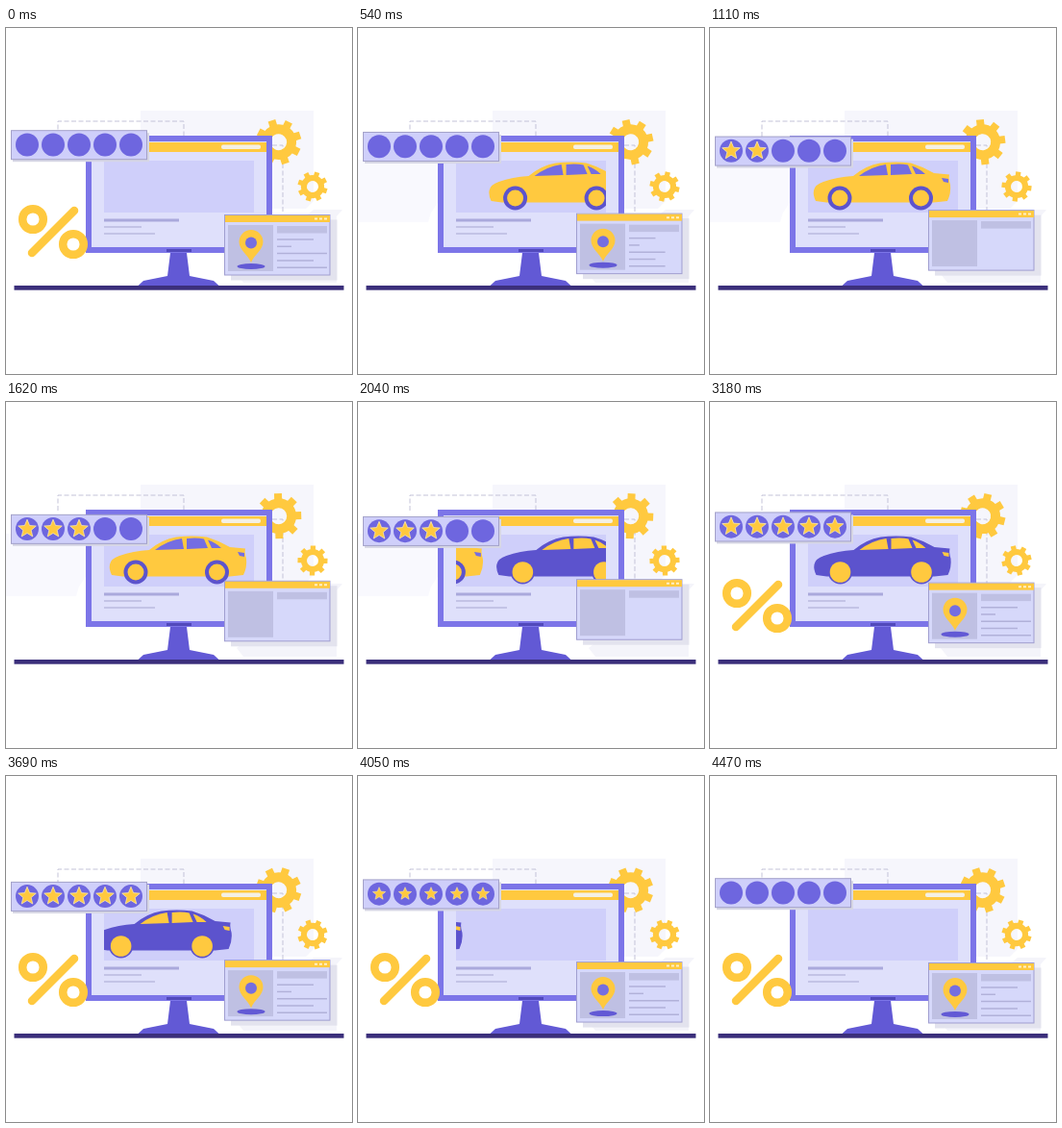
An HTML page for the animation above (4500 ms loop, 360 by 360 pixels).

```html
<!DOCTYPE html>
<html lang="en">
<head>
<meta charset="utf-8">
<title>Car rating</title>
<style>
html, body { margin: 0; width: 100%; height: 100%; overflow: hidden; background: #fff; }
svg { display: block; width: 100vw; height: 100vh; }
</style>
</head>
<body>
<svg viewBox="0 0 360 360">
  <defs>
    <clipPath id="screen"><rect x="102" y="134" width="156" height="58"/></clipPath>
    <g id="car">
      <path class="body" d="M-27 -8Q-26 -14 -17 -17Q-3 -22 14 -23Q27 -34 42 -36.500Q58 -38.500 74 -36.500Q86 -33 98 -26L114 -24.500Q113 -20 115 -14Q116 -5 112 3L98 4.500H-14L-25 3Q-28 -3 -27 -8Z"/>
      <path class="glass" d="M20 -23Q33 -33 48 -35L50 -24ZM53 -35Q64 -36 71 -34.500L75 -25L53 -24ZM75 -33.500Q83 -31 89 -25L79 -25Z"/>
      <path class="glass" d="M106 -21L113 -20V-16L108 -17Z"/>
    </g>
  </defs>

  <path d="M140 86H320V180L312 188H140Z" fill="#f6f6fc"/>
  <path id="haze" d="M0 137H84V180L76 192L73 202H0Z" fill="#f9f9fe"/>
  <path d="M54 113V97H185V113M262 122H288V192" fill="none" stroke="#c3c2d8" stroke-dasharray="5 2.500"/>
  <g fill="none" stroke="#ffc93f">
    <g id="bigGear"></g>
    <g id="smallGear"></g>
  </g>

  <path d="M320 189H350L344 196V265H247L240 256Z" fill="#f4f4fa"/>
  <rect x="83" y="112" width="194" height="122" fill="#7c75e8"/>
  <rect x="89" y="118" width="182" height="110" fill="#dfe0fb"/>
  <rect x="89" y="119" width="182" height="10" fill="#ffc93f"/>
  <rect x="224" y="121.500" width="41" height="4.500" rx="2" fill="#f4f0e4"/>
  <rect x="102" y="138" width="156" height="54" fill="#cfcffa"/>
  <path d="M102 200H180" stroke="#aaa9dc" stroke-width="3"/>
  <path d="M102 207H141M102 214H155" stroke="#bbbbe0" stroke-width="1.500"/>
  <g clip-path="url(#screen)"><g id="yellowCar"></g><g id="purpleCar"></g></g>
  <path d="M171 234H188L191 258L216 263L222 268.500H137L143 263L168 258Z" fill="#6259d5"/>
  <path d="M167 230H193V233H167Z" fill="#5149bb"/>
  <rect x="8.500" y="268" width="343" height="4.700" fill="#3b2f7b"/>

  <g id="percent" fill="none" stroke="#ffc93f" stroke-width="8.500">
    <circle cx="28" cy="199" r="10.800"/>
    <circle cx="70" cy="225" r="10.800"/>
    <path d="M27 234L71 190" stroke-linecap="round"/>
  </g>

  <g id="rating">
    <rect x="7" y="3" width="142" height="30" fill="#d6d6e4"/>
    <rect x="5.500" y=".5" width="141" height="30" fill="#cfcffa" stroke="#a3a1c9"/>
  </g>

  <g id="card">
    <rect x="234" y="5.500" width="110.500" height="63" fill="#e3e3ee"/>
    <rect x="227.500" y=".5" width="109.500" height="62.500" fill="#d6d8fa" stroke="#a09ed0"/>
    <rect x="228" y="1" width="109" height="7" fill="#ffc93f"/>
    <path d="M321 4.500H335" stroke="#fff0c4" stroke-width="2" stroke-dasharray="3 2"/>
    <rect x="231" y="11" width="47" height="48" fill="#bfc0e3"/>
    <rect x="282" y="12" width="52" height="7.500" fill="#bfc0e3"/>
    <g id="lines" stroke="#b1b1d9" stroke-width="1.500"></g>
    <ellipse id="pinShadow" cx="255" cy="54" rx="14.500" ry="3" fill="#6259d5"/>
    <g id="pin">
      <path d="M255 50C252 42 242.500 37 242.500 28.500A12.500 12.500 0 0 1 267.500 28.500C267.500 37 258 42 255 50Z" fill="#ffc93f"/>
      <circle cx="255" cy="29.500" r="6" fill="#756ee0"/>
    </g>
  </g>
</svg>
<script>
const LOOP = 4500, SLIDE = 600, STEP = 156;
const YELLOW = '#ffc93f', PURPLE = '#5c53cd', VIOLET = '#746de2';
const ENTER = 110, SWAP = 1632, LEAVE = 3567;
const $ = id => document.getElementById(id);

// eased 0..1 progress of a move
const ease = (t, start, length) => {
  const p = Math.min(1, Math.max(0, (t - start) / length));
  return (1 - Math.cos(Math.PI * p)) / 2;
};
const move = (id, x, y, rest = '') => $(id).setAttribute('transform', `translate(${x} ${y}) ${rest}`);
const scaleAround = (id, x, y, s) => move(id, x, y, `scale(${s}) translate(${-x} ${-y})`);

function add(parent, tag, attrs) {
  const node = document.createElementNS('http://www.w3.org/2000/svg', tag);
  for (const name in attrs) node.setAttribute(name, attrs[name]);
  return parent.appendChild(node);
}

function buildCar(id, body, accent, tyre) {
  const car = $(id);
  for (const part of $('car').children) {
    const copy = car.appendChild(part.cloneNode());
    copy.setAttribute('fill', part.matches('.body') ? body : accent);
  }
  for (const cx of [0, 84.5]) {
    add(car, 'circle', { cx, r: 12.5, fill: tyre });
    add(car, 'circle', { cx, r: tyre === body ? 10.8 : 8.5, fill: YELLOW });
  }
}

function buildGear(id, outer, hole) {
  const root = outer * 0.78, gear = $(id);
  add(gear, 'circle', { r: (root + hole) / 2, 'stroke-width': root - hole });
  for (let i = 0; i < 8; i++)
    add(gear, 'path', { d: `M0 ${-root + 1}V${-outer}`, 'stroke-width': outer * 0.34, transform: `rotate(${i * 45})` });
}

buildCar('yellowCar', YELLOW, VIOLET, PURPLE);
buildCar('purpleCar', PURPLE, YELLOW, PURPLE);
buildGear('bigGear', 23.5, 8.5);
buildGear('smallGear', 15.5, 6);

const starPoints = Array.from({ length: 10 }, (_, i) => {
  const r = i % 2 ? 4.4 : 9.8, a = i * Math.PI / 5;
  return [r * Math.sin(a), -r * Math.cos(a)];
}).join(' ');
const stars = Array.from({ length: 5 }, (_, i) => {
  add($('rating'), 'circle', { cx: 22 + 27 * i, cy: 15.2, r: 12, fill: '#6e66df' });
  return add($('rating'), 'polygon', { points: starPoints, fill: YELLOW, stroke: '#fff0b8', 'stroke-width': 0.7 });
});
const lineWidths = [38, 15, 52, 38, 52];
const lines = lineWidths.map(() => add($('lines'), 'path', {}));

function starScale(t, i) {
  const rated = (arrive, leave) => ease(t, arrive + 60 + 190 * i, 150) - ease(t, leave + 430, 150);
  return (i < 3 ? rated(ENTER + SLIDE, SWAP) : 0) + rated(SWAP + SLIDE, LEAVE);
}

function draw(t) {
  const swap = ease(t, SWAP, SLIDE);
  move('yellowCar', 135 + STEP * (1 - ease(t, ENTER, SLIDE) - swap), 177);
  move('purpleCar', 135.5 + STEP * (1 - swap - ease(t, LEAVE, SLIDE)), 177);

  // the rating bar and the card float in opposite directions
  const float = Math.cos(2 * Math.PI * t / LOOP);
  move('rating', 0, 112.7 - 6.5 * float);
  move('card', 0, 189 + 5 * float);
  stars.forEach((star, i) =>
    star.setAttribute('transform', `translate(${22 + 27 * i} 15.2) scale(${starScale(t, i)})`));

  const percent = 1 - ease(t, 250, 200) + ease(t, 2380, 200);
  scaleAround('percent', 49, 212, percent);
  $('haze').setAttribute('opacity', 1 - percent);

  const pin = 1 - ease(t, 700, 220) + ease(t, 2570, 220);
  scaleAround('pin', 255, 54, pin);
  $('pinShadow').setAttribute('opacity', Math.max(0, 2 * pin - 1));
  lines.forEach((line, i) => {
    const grown = 1 - ease(t, 400, 400) + ease(t, 2480 + 60 * i, 300);
    line.setAttribute('d', grown > 0.01 ? `M282 ${26 + 7.3 * i}h${lineWidths[i] * grown}` : '');
  });

  const turn = 45 * t / LOOP - 18;
  move('bigGear', 283.7, 118.7, `rotate(${turn})`);
  move('smallGear', 319, 165, `rotate(${-turn})`);
}

function tick() {
  draw(performance.now() % LOOP);
  requestAnimationFrame(tick);
}
tick();
</script>
</body>
</html>
```
